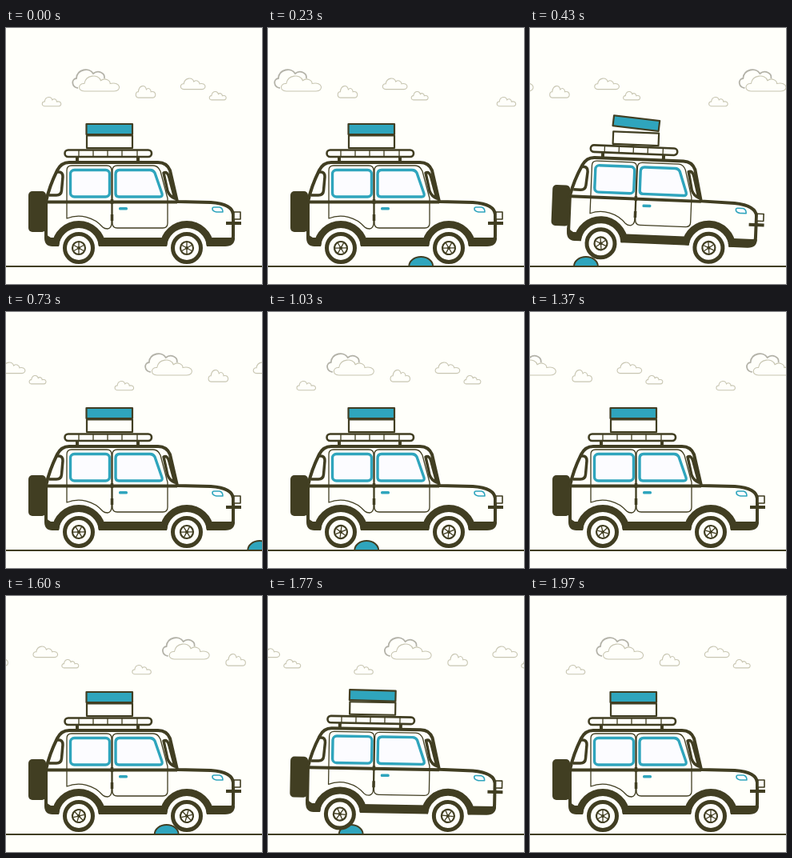
Recreate the animation shown at these times as an HTML page. Size 320 px wide and 320 px high, loop 2 s.

```html
<!DOCTYPE html>
<html lang="en">
<head>
<meta charset="utf-8">
<title>Road trip</title>
<style>
  html, body { margin: 0; width: 100%; height: 100%; overflow: hidden; background: #fffffa; }
  svg { display: block; width: 100vw; height: 100vh; --ink: #413e22; --teal: #2fa5bd; --paper: #fffffa; }
  .line { fill: none; stroke: var(--ink); stroke-linejoin: round; }
  .thin { stroke-width: 1.3; }
  .mid { stroke-width: 2.2; }
  .frame { stroke-width: 3.5; }
  .bold { stroke-width: 4; }
  .arch { stroke-width: 9; }
  .paper { fill: var(--paper); }
  .ink { fill: var(--ink); }
  .teal { fill: var(--teal); }
  .glass { fill: #fcfcff; stroke: var(--teal); stroke-width: 3.4; stroke-linejoin: round; }
  .cloud { fill: var(--paper); stroke: #c8c6b2; stroke-width: 1.1; }
  .back { stroke: #b3b2a8; stroke-width: 1.8; }
</style>
</head>
<body>
<svg viewBox="0 0 320 320">
  <defs>
    <path id="puff" vector-effect="non-scaling-stroke"
      d="M7 20C-2 20-1 9 7 10C9-2 25-3 28 6C33 2 40 5 40 10C54 7 55 20 45 20Z"/>
    <g id="sky" class="cloud">
      <path class="back" d="M90 75C82 74 81 64 88 63C89 51 104 49 109 57C115 52 124 56 123 63"/>
      <use href="#puff" transform="translate(91 60) scale(.98 .95)"/>
      <use href="#puff" transform="translate(45 86.5) scale(.46 .56)"/>
      <use href="#puff" transform="translate(162 72.5) scale(.48 .73)"/>
      <use href="#puff" transform="translate(218 63) scale(.6 .68)"/>
      <use href="#puff" transform="translate(254 79.5) scale(.41 .52)"/>
    </g>
    <path id="rock" class="line teal" stroke-width="2" d="M-15 298A15 12 0 0 1 15 298Z"/>
    <g id="wheel">
      <circle r="17.5" class="line paper" stroke-width="5"/>
      <g class="spin">
        <circle r="8" class="line mid"/>
        <path class="line thin" d="M0-7V7M-6.06-3.5L6.06 3.5M-6.06 3.5L6.06-3.5"/>
      </g>
      <circle r="2" class="ink"/>
    </g>
  </defs>

  <g id="clouds">
    <use href="#sky"/>
    <use href="#sky" x="316"/>
    <use href="#sky" x="613"/>
  </g>

  <g id="rocks"></g>
  <path class="line" stroke-width="2" d="M0 298H320"/>

  <g id="car">
    <rect class="ink" x="28" y="204" width="22" height="51" rx="5"/>

    <!-- luggage and rack -->
    <rect class="line mid paper" x="101" y="134.5" width="57" height="15.5"/>
    <g id="case">
      <rect class="line mid teal" x="100.5" y="120" width="57.5" height="13"/>
    </g>
    <path class="line bold" d="M89 161V167M165 161V167"/>
    <rect class="line paper" stroke-width="2.6" x="73.500" y="152.5" width="108.500" height="8.500" rx="4.2"/>
    <path class="line thin" d="M91 152V161M109 152V161M127 152V161M145 152V161M164 152V161"/>

    <!-- shell -->
    <path class="line bold paper"
      d="M50 217C53 203 57 192 64 178Q69 168 79 168H190Q201 168 205 178L214 217L256 218Q283 220 284 233V260Q284 270 274 270H60Q50 270 50 258Z"/>
    <path class="line bold" d="M50 217.5H214"/>
    <path class="ink" d="M48 257L56 262H66V273H58Q48 273 48 262ZM116 262H201V273H116ZM251 262H286Q286 273 274 273H251Z"/>
    <path class="paper" d="M66 275A25 25 0 0 1 116 275ZM201 275A25 25 0 0 1 251 275Z"/>
    <path class="line arch" d="M61.6 272.5A29.5 29.5 0 0 1 120.4 272.5M196.6 272.5A29.5 29.5 0 0 1 255.4 272.5"/>

    <!-- windows -->
    <path class="line frame" d="M62 180H66Q71 180 71 186L69.500 203Q69 209 63 209H54"/>
    <path class="line frame" d="M197 181Q202 179 204 187L211 213Q205 211 202 204Z"/>
    <rect class="glass" x="80.5" y="177.5" width="49" height="33.5" rx="5"/>
    <path class="glass" d="M142 177.5H180Q184 177.5 186 181L195 207Q196 211 192 211H141Q137 211 137 207V183Q137 177.5 142 177.5Z"/>

    <!-- doors -->
    <path class="line thin" d="M132 178Q132 172 126 172H82Q76 172 76 178V238A40 40 0 0 1 121 249Q123 251 127 251Q132 250 132 244ZM133 178Q133 172 139 172H184Q190 172 193 179L202 213V244Q202 250 196 250H139Q133 250 133 244Z"/>
    <path class="line frame" d="M132.5 214V220M132.5 233V241"/>
    <rect class="teal" x="141" y="224" width="11" height="3.5" rx="1.5"/>

    <!-- front end -->
    <path class="glass" style="stroke-width:1.6" d="M260 224H267Q271 225 271 230H263Q258 229 258 226Q258 224 260 224Z"/>
    <rect class="line paper" stroke-width="1.6" x="285" y="230" width="8" height="9"/>
    <rect class="ink" x="275" y="242" width="19" height="4"/>

    <use href="#wheel" x="91" y="275"/>
    <use href="#wheel" x="226" y="275"/>
  </g>
</svg>

<script>
  const LOOP = 2000, POSES = 49;
  const CLOUD_STEP = 613 / POSES, ROCK_STEP = 24.25;
  const ROCK_START = 336.7, ROCK_GAP = 417, ROCKS = 3;
  const FRONT = 226, REAR = 91;
  const SPIN = 53 * 60 / POSES;
  const TILT = 2.4, LIFT = 2.9;

  // [poses since the rock passed under the axle, share of the full bump]
  const frontBump = [[-1.2, 0], [-0.1, 1], [0.95, 0]];
  const rearBump = [[-1.2, 0], [0.4, 1], [0.9, 0.97], [2.2, 0]];
  const caseHop = [[-0.7, 0], [0.9, 1], [2.4, 0]];

  const $ = id => document.getElementById(id);
  const move = (el, value) => el.setAttribute("transform", value);
  const spinner = document.querySelector(".spin");
  const rocks = Array.from({ length: ROCKS }, () => {
    const use = document.createElementNS("http://www.w3.org/2000/svg", "use");
    use.setAttribute("href", "#rock");
    return $("rocks").appendChild(use);
  });

  function sample(points, u) {
    for (let i = 1; i < points.length; i++) {
      const [a, from] = points[i - 1], [b, to] = points[i];
      if (u >= a && u <= b) return from + (to - from) * (u - a) / (b - a);
    }
    return 0;
  }

  // 25 poses a second, shown at 30 pictures a second
  function poseAt(ms) {
    const picture = Math.min(59, Math.floor((ms % LOOP + 3.4) * 0.03));
    return Math.max(0, Math.ceil(picture * 5 / 6 - 0.5));
  }

  function draw(pose) {
    let front = 0, rear = 0, hop = 0;
    rocks.forEach((rock, i) => {
      const x = ROCK_START + ROCK_GAP * i - ROCK_STEP * pose;
      const past = axle => (axle - x) / ROCK_STEP;
      move(rock, `translate(${x} 0)`);
      front += sample(frontBump, past(FRONT));
      rear += sample(rearBump, past(REAR));
      hop += sample(caseHop, past(REAR));
    });
    move($("clouds"), `translate(${-CLOUD_STEP * pose} 0)`);
    move($("car"), `translate(0 ${-LIFT * (front + rear)}) rotate(${TILT * (rear - front)} 160 212)`);
    move($("case"), `translate(0 ${-3.5 * hop}) rotate(${4.5 * hop} 129 126)`);
    move(spinner, `rotate(${SPIN * pose})`);
  }

  const start = performance.now();
  function tick() {
    draw(poseAt(performance.now() - start));
    requestAnimationFrame(tick);
  }
  tick();
</script>
</body>
</html>
```
